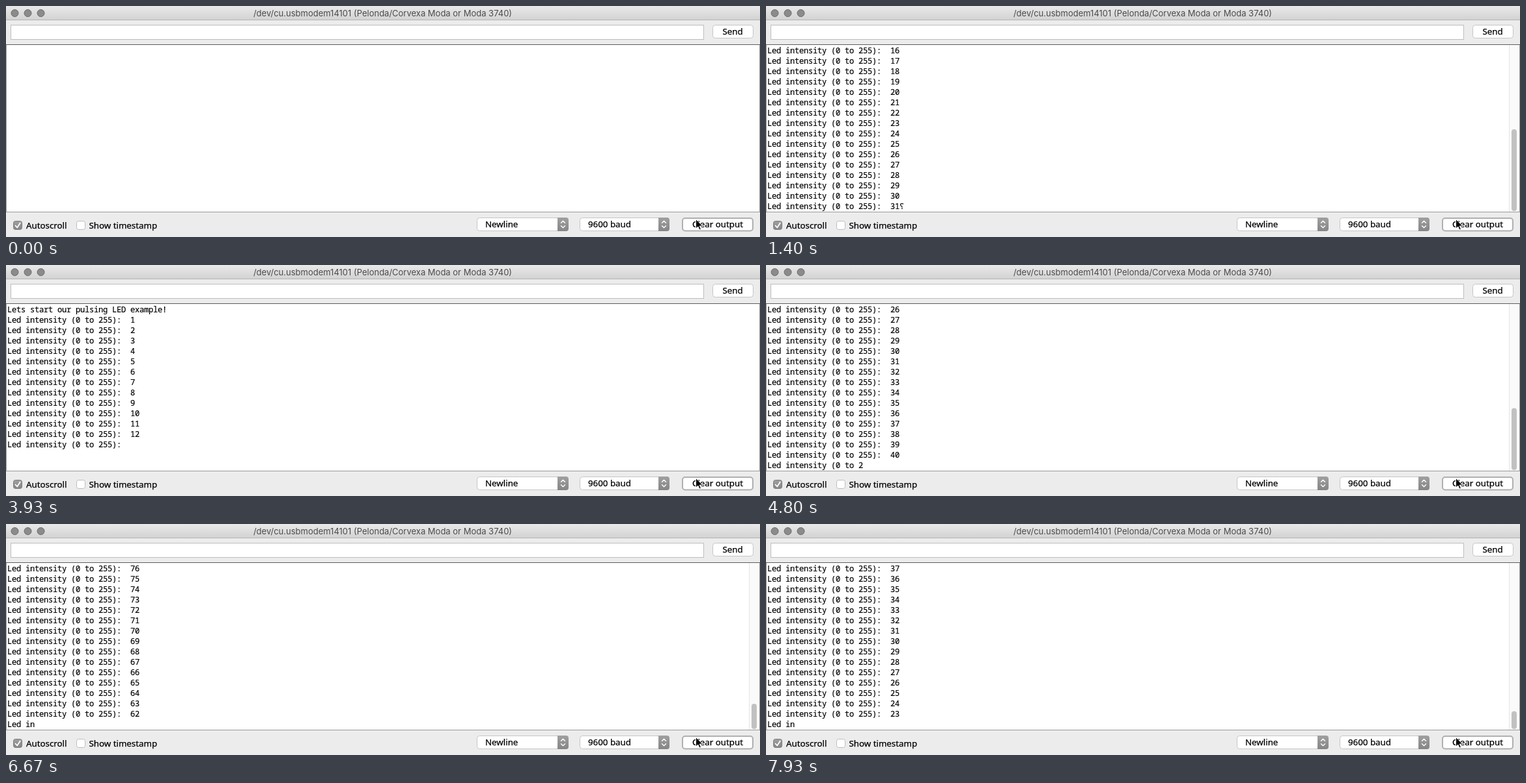
An HTML page that plays this animation: 1158x356 px, repeating every 8000 ms.

```html
<!DOCTYPE html>
<html lang="en">
<head>
<meta charset="utf-8">
<title>Serial monitor</title>
<style>
  html, body { margin: 0; width: 100%; height: 100%; overflow: hidden; background: #ececec; }
  svg { display: block; width: 1158px; height: 356px; }
  text { white-space: pre; }
  .title { font: 13px Inter, sans-serif; fill: #4b4b4b; text-anchor: middle; }
  .ui { font: 13.3px "Noto Sans", "Open Sans", sans-serif; fill: #000; stroke: #000; stroke-width: .25px; }
  .mid { text-anchor: middle; }
  .log { font: 12px "Noto Sans Mono", "DejaVu Sans Mono", "DejaVu Sans", monospace;
         letter-spacing: -.2px; fill: #000; stroke: #000; stroke-width: .2px; }
  .field { fill: #fff; stroke: #bdbdbd; }
  .button { fill: #fff; stroke: #c6c6c6; }
  .chevrons { fill: none; stroke: #fff; stroke-width: 1.4; stroke-linecap: round; stroke-linejoin: round; }
</style>
</head>
<body>
<svg viewBox="0 0 1158 356">
  <defs>
    <linearGradient id="bar" x2="0" y2="1">
      <stop stop-color="#e9e9e9"/><stop offset="1" stop-color="#d2d2d2"/>
    </linearGradient>
    <linearGradient id="cap" x2="0" y2="1">
      <stop stop-color="#a0a0a0"/><stop offset="1" stop-color="#858585"/>
    </linearGradient>
    <g id="light"><circle r="5.5" fill="#8b8b8b" stroke="#6c6c6c"/></g>
    <g id="stepper">
      <path d="M0 0h13a4 4 0 0 1 4 4v13a4 4 0 0 1-4 4H0z" fill="url(#cap)"/>
      <path class="chevrons" d="M5.5 8.3l3-3 3 3M5.5 12.7l3 3 3-3"/>
    </g>
  </defs>

  <rect width="1158" height="356" fill="#ececec"/>
  <rect width="1158" height="22" fill="url(#bar)"/>
  <path d="M0 21.5H1158" stroke="#b4b4b4"/>
  <use href="#light" x="13.5" y="11"/>
  <use href="#light" x="33.5" y="11"/>
  <use href="#light" x="53.5" y="11"/>
  <text class="title" x="578.5" y="16">/dev/cu.usbmodem14101 (Pelonda/Corvexa Moda or Moda 3740)</text>

  <rect class="field" x="7.5" y="29.5" width="1064" height="22"/>
  <rect class="button" x="1085.5" y="29.5" width="62" height="20" rx="4"/>
  <text class="ui mid" x="1116" y="44">Send</text>

  <rect x=".5" y="59.5" width="1157" height="258" fill="#fff" stroke="#9a9a9a"/>
  <path d="M0 59.5H1158" stroke="#5c5c5c"/>
  <g id="scrollbar">
    <rect x="1141" y="60" width="16" height="257" fill="#fafafa"/>
    <path d="M1141.5 60V317" stroke="#e6e6e6"/>
    <rect id="thumb" x="1145" width="8" rx="4" fill="#c1c1c1"/>
  </g>
  <g id="log" class="log"></g>

  <rect x="11.5" y="331.5" width="13" height="13" rx="3" fill="url(#cap)" stroke="#7d7d7d"/>
  <path d="M14.5 338.5l2.7 3 4.5-7" fill="none" stroke="#fff" stroke-width="1.8" stroke-linecap="round" stroke-linejoin="round"/>
  <text class="ui" x="31" y="343">Autoscroll</text>
  <rect class="field" x="108.5" y="331.5" width="13" height="13" rx="3"/>
  <text class="ui" x="127.5" y="343">Show timestamp</text>

  <rect class="button" x="723.5" y="326.5" width="140" height="20" rx="4"/>
  <use href="#stepper" x="847" y="326"/>
  <text class="ui" x="736" y="341">Newline</text>
  <rect class="button" x="881.5" y="326.5" width="137" height="20" rx="4"/>
  <use href="#stepper" x="1002" y="326"/>
  <text class="ui" x="894" y="341">9600 baud</text>

  <rect x="1039" y="327" width="108" height="19.5" rx="4" fill="#fff" stroke="#b0b0b0" stroke-width="2"/>
  <text class="ui mid" x="1093" y="341">Clear output</text>
  <path d="M1059.5 328.5v14.6l3.3-3.1 2.2 5 2.4-1.1-2.2-4.8h4.6z" fill="#000" stroke="#fff" stroke-width="1"/>
</svg>
<script>
const LOOP = 8000, ROWS = 16, PEAK = 80;
const byId = id => document.getElementById(id);

// Everything the board prints: brightness counts up to the peak and back down.
let stream = "Lets start our pulsing LED example!\r\n";
for (let k = 1; k < 2 * PEAK; k++) {
  stream += `Led intensity (0 to 255):  ${PEAK - Math.abs(PEAK - k)}\r\n`;
}

// [tick, characters received] for each run, at 15 ticks per second.
const firstRun = [[6, 28], [21, 987]];
const secondRun = [[53, 42], [59, 426], [66, 907], [72, 1289], [88, 2304],
                   [100, 3072], [115, 4024], [116, 4095], [119, 4281]];

function received(run, tick) {
  if (tick < run[0][0]) return 0;
  for (let i = 1; i < run.length; i++) {
    const [t0, c0] = run[i - 1], [t1, c1] = run[i];
    if (tick <= t1) return Math.round(c0 + (c1 - c0) * (tick - t0) / (t1 - t0));
  }
  return run[run.length - 1][1];
}

function output(tick) {
  if (tick >= 48) return stream.slice(0, received(secondRun, tick));
  return stream.slice(0, received(firstRun, tick)) + (tick >= 21 ? "\u2E2E" : "");
}

// Tick times fall on whole hundredths of a second.
function tickAt(ms) {
  let tick = Math.floor(ms * 0.015) + 1;
  while (Math.round(tick * 20 / 3) * 10 > ms) tick--;
  return tick;
}

const rows = Array.from({ length: ROWS }, (_, i) => {
  const row = document.createElementNS("http://www.w3.org/2000/svg", "text");
  row.setAttribute("x", 2);
  row.setAttribute("y", 73 + 16 * i);
  return byId("log").appendChild(row);
});

function render(tick) {
  const lines = output(tick).split("\r\n").map(line => line.replace("\r", ""));
  const top = Math.max(0, lines.length - ROWS);
  rows.forEach((row, i) => { row.textContent = lines[top + i] || ""; });
  byId("scrollbar").style.display = top ? "" : "none";
  const length = 256 * ROWS / lines.length - 2;
  byId("thumb").setAttribute("y", 316 - length);
  byId("thumb").setAttribute("height", length);
}

const start = performance.now();
let shown = -1;
function frame() {
  const tick = tickAt((performance.now() - start) % LOOP);
  if (tick !== shown) render(shown = tick);
  requestAnimationFrame(frame);
}
frame();
</script>
</body>
</html>
```
